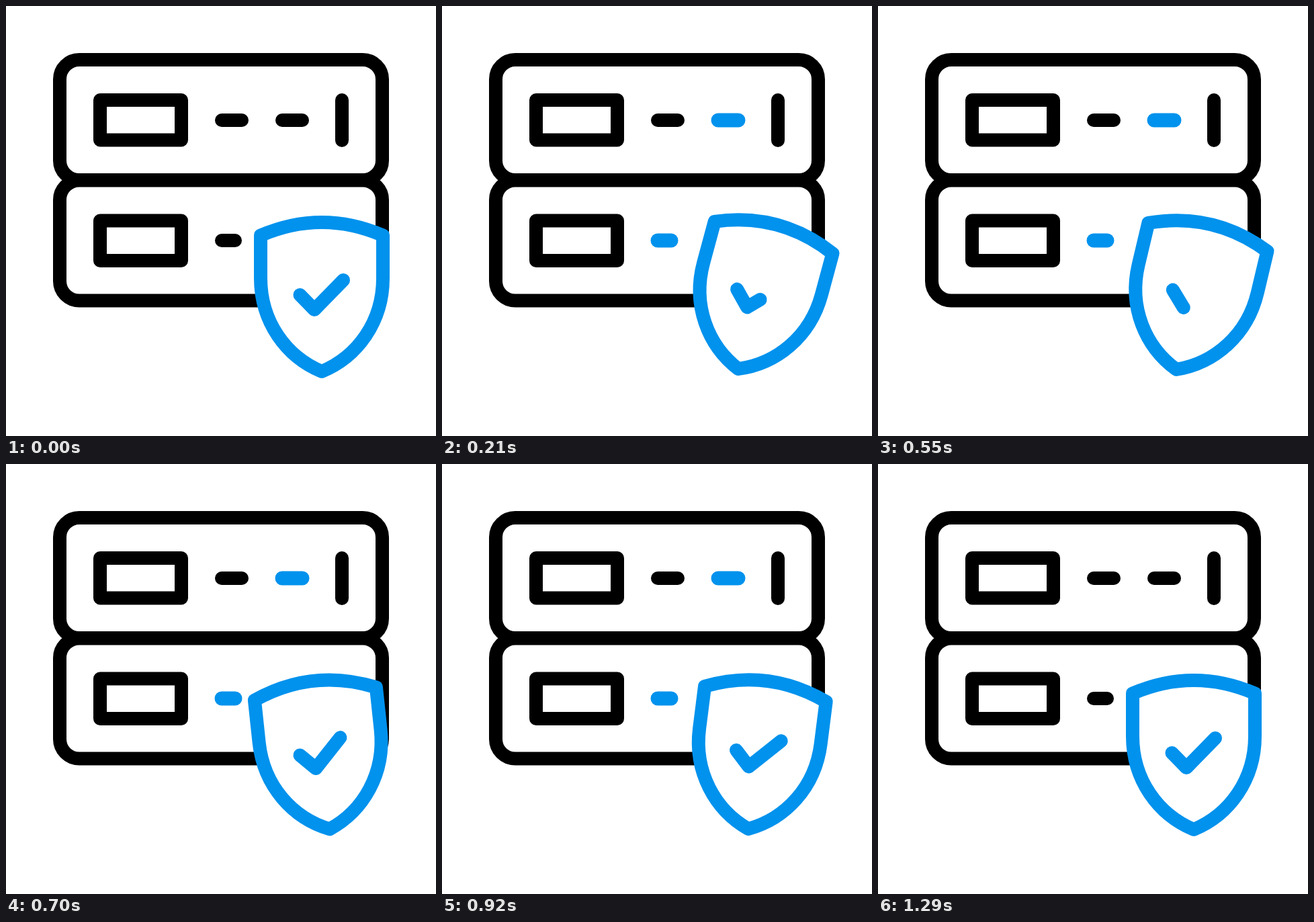
An HTML page with a canvas that plays this animation: 640x640 px, repeating every 1.66 s.

```html
<!DOCTYPE html>
<html lang="en">
<head>
<meta charset="utf-8">
<title>Secure server</title>
<style>
  html, body { margin: 0; width: 100%; height: 100%; overflow: hidden; background: #fff; }
  canvas { display: block; width: 640px; height: 640px; }
</style>
</head>
<body>
<canvas id="stage" width="640" height="640"></canvas>
<script>
const ctx = document.getElementById('stage').getContext('2d');
const LOOP = 1660;
const LAST_STEP = 39;
const BLACK = '#000';
const BLUE = '#0092ed';
const PIVOT = [470, 432];

// [time in ms, value], eased between neighbours
const SWING = [[0, 0], [400, 28], [735, -7], [910, 7.3], [1090, -4.2], [1290, 0]];
const TICK_SHOWN = [[30, 1], [430, 0], [735, 1]];
const TICK = [[437.5, 430], [459, 452], [502, 408]];

const ease = s => (1 - Math.cos(Math.PI * s)) / 2;

function valueAt(keys, t) {
  if (t <= keys[0][0]) return keys[0][1];
  for (let i = 1; i < keys.length; i++) {
    const [t0, v0] = keys[i - 1], [t1, v1] = keys[i];
    if (t <= t1) return v0 + (v1 - v0) * ease((t - t0) / (t1 - t0));
  }
  return keys[keys.length - 1][1];
}

// Steps last 30 ms, every fifteenth one 70 ms
const stepStart = n => 30 * n + 40 * Math.floor((n + 7) / 15);

function snapToStep(t) {
  let n = LAST_STEP;
  while (stepStart(n) > t) n--;
  return stepStart(n);
}

function stroke(color, width = 20) {
  ctx.strokeStyle = color;
  ctx.lineWidth = width;
  ctx.stroke();
}

function polyline(points) {
  ctx.beginPath();
  points.forEach(([x, y]) => ctx.lineTo(x, y));
}

function line(x1, y1, x2, y2, color = BLACK, width = 20) {
  polyline([[x1, y1], [x2, y2]]);
  stroke(color, width);
}

function serverUnit(y) {
  ctx.beginPath();
  ctx.roundRect(80, y, 480, 179, 29);
  stroke(BLACK);
  ctx.beginPath();
  ctx.rect(140, y + 60, 121, 59.5);
  stroke(BLACK);
}

function lamp(x1, x2, y, lit) {
  line(x1, y, x2, y, lit ? BLUE : BLACK, lit ? 21 : 20);
}

function shield() {
  ctx.beginPath();
  ctx.moveTo(379, 341.5);
  ctx.quadraticCurveTo(470, 302.5, 561, 341.5);
  ctx.lineTo(561, 405);
  ctx.bezierCurveTo(561, 470, 523, 522, 470, 544);
  ctx.bezierCurveTo(417, 522, 379, 470, 379, 405);
  ctx.closePath();
  ctx.fillStyle = '#fff';
  ctx.fill();
  stroke(BLUE);
}

function tick(shown) {
  if (shown < 0.005) return;
  const [a, b, c] = TICK;
  const length = Math.hypot(b[0] - a[0], b[1] - a[1]) + Math.hypot(c[0] - b[0], c[1] - b[1]);
  polyline(TICK);
  if (shown < 1) ctx.setLineDash([length * shown, length * 2]);
  stroke(BLUE);
  ctx.setLineDash([]);
}

function draw(t) {
  const lit = t >= stepStart(1) && t < stepStart(LAST_STEP);
  ctx.fillStyle = '#fff';
  ctx.fillRect(0, 0, 640, 640);
  ctx.lineCap = ctx.lineJoin = 'round';

  serverUnit(80);
  serverUnit(259.5);
  lamp(321, 351, 170, false);
  lamp(411, 441, 170, lit);
  lamp(321, 341, 349, lit);
  line(500, 140, 500, 200);

  ctx.save();
  ctx.translate(...PIVOT);
  ctx.rotate(valueAt(SWING, t) * Math.PI / 180);
  ctx.translate(-PIVOT[0], -PIVOT[1]);
  shield();
  tick(valueAt(TICK_SHOWN, t));
  ctx.restore();
}

const begin = performance.now();

function tickFrame() {
  draw(snapToStep((performance.now() - begin) % LOOP));
  requestAnimationFrame(tickFrame);
}
tickFrame();
</script>
</body>
</html>
```
